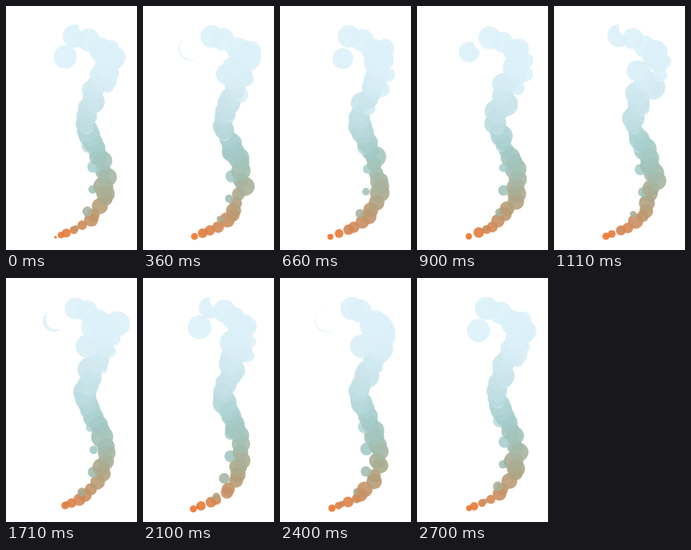
An HTML page with a canvas for the animation above (2.73 s loop, 164 by 305 pixels).

```html
<!DOCTYPE html>
<html lang="en">
<head>
<meta charset="utf-8">
<title>Smoke trail</title>
<style>
  html, body { margin: 0; width: 100%; height: 100%; overflow: hidden; background: #fff; }
  canvas { display: block; }
</style>
</head>
<body>
<canvas id="stage" width="164" height="305"></canvas>
<script>
const ctx = document.getElementById('stage').getContext('2d');
const STEP = 30, CYCLE = 91;   // ms per step, steps per loop
const BIG = 36, SMALL = 12;    // circles born per loop

// Keys are [age in steps, ...values].
const RISE = [[0, 62, 289], [8, 93, 277], [14, 112, 261], [19, 121, 243], [25, 126, 221],
  [33, 119, 191], [40, 108, 168], [47, 98, 147], [54, 106, 122], [62, 116, 98]];
const KINDS = {
  puff: { life: 90, path: [...RISE, [80, 125, 58], [90, 123, 50]] },
  left: { life: 92, path: [...RISE, [73, 98, 77], [80, 75, 63], [92, 58, 53]] },
  over: { life: 113, path: [...RISE, [78, 125, 60], [95, 103, 42], [113, 79, 36]] }
};
const COLORS = [[0, 240, 114, 42], [10, 205, 140, 92], [20, 173, 166, 134], [30, 162, 192, 180],
  [38, 164, 204, 202], [50, 195, 224, 229], [65, 215, 237, 245], [78, 221, 241, 249]];

let seed = 7;
const random = (min, max) => {
  seed = seed * 16807 % 2147483647;
  return min + (max - min) * seed / 2147483647;
};

const puffs = [];
for (let i = 0; i < BIG; i++) {
  const turn = i % 9;
  const kind = turn === 4 ? 'left' : turn === 2 || turn === 7 ? 'over' : 'puff';
  puffs.push({
    kind, tint: 0,
    birth: 1 + i * CYCLE / BIG + random(-.6, .6),
    size: kind === 'puff' ? random(.75, 1.15) : random(.9, 1.05),
    swing: random(-4, 4),
    spread: kind === 'puff' ? random(-14, 16) : 0
  });
}
for (let i = 0; i < SMALL; i++)
  puffs.push({
    kind: 'puff', tint: 10, spread: 0,
    birth: i * CYCLE / SMALL, size: random(.42, .68), swing: random(12, 17)
  });

function at(keys, t) {
  let i = 1;
  while (i < keys.length - 1 && keys[i][0] < t) i++;
  const a = keys[i - 1], b = keys[i];
  const k = Math.min(1, (t - a[0]) / (b[0] - a[0]));
  return a.slice(1).map((v, n) => v + (b[n + 1] - v) * k);
}

function drawPuff({ kind, size, swing, spread, tint }, age) {
  const { life, path } = KINDS[kind];
  let [x, y] = at(path, age);
  x -= swing * Math.min(1, age / 15) * Math.sin(Math.PI * age / 45);
  x += spread * Math.min(1, Math.max(0, (age - 45) / 30));
  let r = size * (4 + 10.5 * (1 - Math.exp(-age / 20)));
  const left = Math.min(1, (life - age) / 6);
  ctx.save();
  if (kind === 'puff') r *= Math.sqrt(left);
  else if (left < 1) {
    // A hole slides in from the upper right and leaves a crescent.
    const gap = 2 * r * left;
    ctx.beginPath();
    ctx.rect(0, 0, 164, 305);
    ctx.arc(x + gap * .8, y - gap * .6, r, 0, 2 * Math.PI);
    ctx.clip('evenodd');
  }
  ctx.fillStyle = `rgba(${at(COLORS, age + Math.min(age, tint)).map(Math.round)},.9)`;
  ctx.beginPath();
  ctx.arc(x, y, r, 0, 2 * Math.PI);
  ctx.fill();
  ctx.restore();
}

function loop(now) {
  const step = Math.floor(now / STEP) % CYCLE;
  const live = [];
  for (const puff of puffs) {
    const first = (step - puff.birth + 2 * CYCLE) % CYCLE;
    for (const age of [first, first + CYCLE])
      if (age < KINDS[puff.kind].life) live.push([age, puff]);
  }
  live.sort((a, b) => a[0] - b[0]);
  ctx.clearRect(0, 0, 164, 305);
  for (const [age, puff] of live) drawPuff(puff, age);
  requestAnimationFrame(loop);
}
requestAnimationFrame(loop);
</script>
</body>
</html>
```
